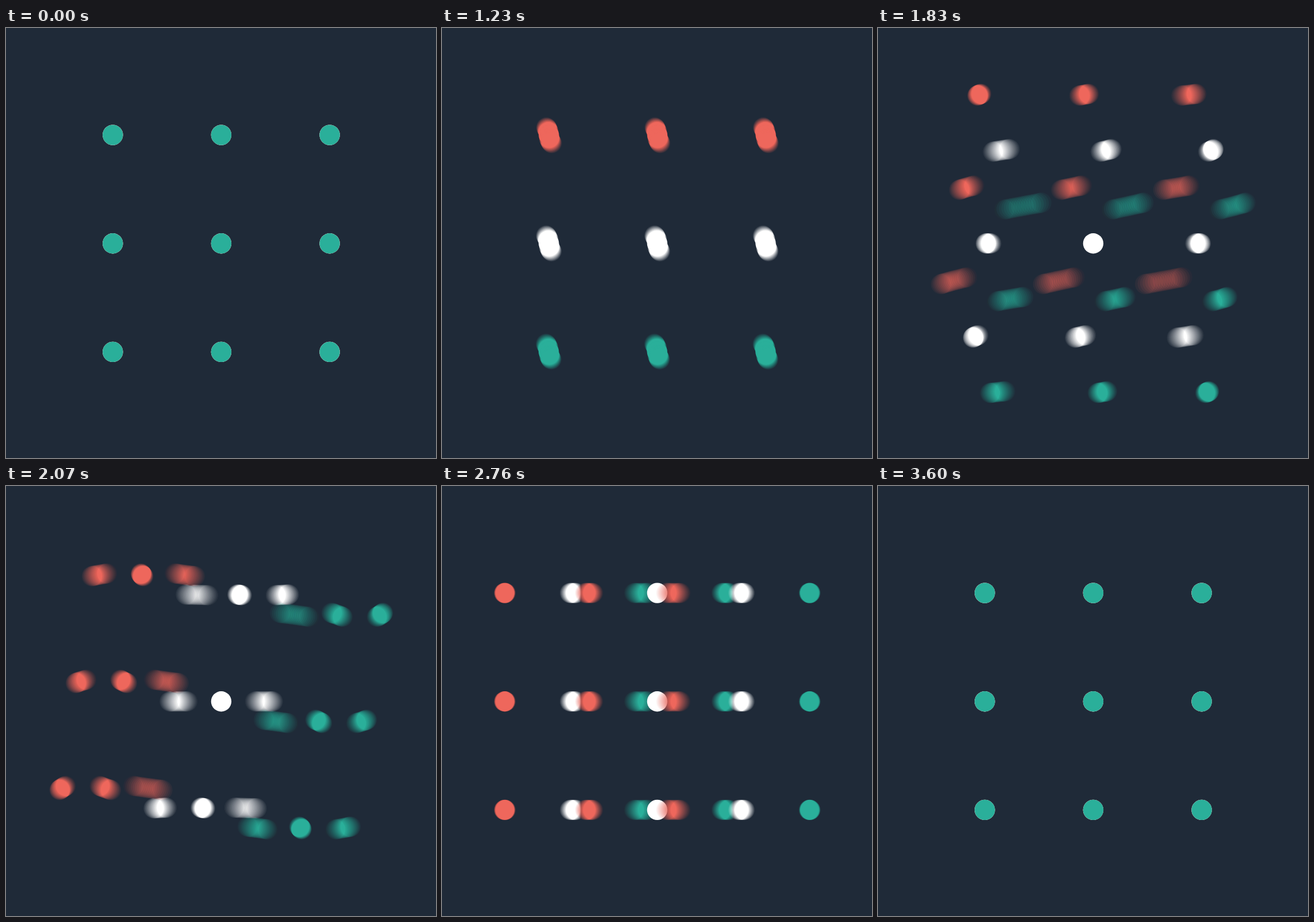
Animation of 748x748 px, one loop 3630 ms. Source, as an HTML page with a canvas:

```html
<!DOCTYPE html>
<html lang="en">
<head>
<meta charset="utf-8">
<title>Turning lattice</title>
<style>
  html, body { margin: 0; width: 100%; height: 100%; overflow: hidden; background: #1f2a38; }
  canvas { display: block; width: 748px; height: 748px; }
</style>
</head>
<body>
<canvas id="stage" width="748" height="748"></canvas>
<script>
const SIZE = 748, LOOP = 3630, STEP = 30;
const CX = 374.4, CY = 374.75, GAP = 188.65, RADIUS = 17.7;
const BG = '#1f2a38';
const COLORS = ['#ee675c', '#ffffff', '#2aaf9a']; // back to front
const SAMPLES = 16;

const view = document.getElementById('stage').getContext('2d');
const buffer = document.createElement('canvas');
buffer.width = buffer.height = SIZE;
const pen = buffer.getContext('2d');

const dots = [];
for (let z = -1; z <= 1; z++)
  for (let y = -1; y <= 1; y++)
    for (let x = -1; x <= 1; x++)
      dots.push({ x, y, z, color: COLORS[z + 1] });

const clamp = p => Math.min(1, Math.max(0, p));
const smooth = p => p * p * (3 - 2 * p);

// Constant speed with a short acceleration and braking
function glide(p) {
  const a = 0.2, v = 1 / (1 - a);
  if (p > 0.5) return 1 - glide(1 - p);
  return p < a ? v * p * p / (2 * a) : v * (p - a / 2);
}

// Tilt half a turn, spin once forward, then half a turn back
function angles(ms) {
  const tilt = Math.PI * glide(clamp(ms / 2400));
  const spin = 2 * Math.PI * smooth(clamp((ms - 1200) / 1200))
             - Math.PI * smooth(clamp((ms - 2400) / 1200));
  return [tilt, spin];
}

function project(dot, tilt, spin) {
  const y = dot.y * Math.cos(tilt) + dot.z * Math.sin(tilt);
  const z = dot.z * Math.cos(tilt) - dot.y * Math.sin(tilt);
  return {
    x: CX + GAP * (dot.x * Math.cos(spin) + z * Math.sin(spin)),
    y: CY + GAP * y,
    depth: z * Math.cos(spin) - dot.x * Math.sin(spin),
    color: dot.color
  };
}

function drawScene(ms) {
  const [tilt, spin] = angles(ms);
  pen.fillStyle = BG;
  pen.fillRect(0, 0, SIZE, SIZE);
  dots.map(d => project(d, tilt, spin))
    .sort((a, b) => a.depth - b.depth)
    .forEach(p => {
      pen.fillStyle = p.color;
      pen.beginPath();
      pen.arc(p.x, p.y, RADIUS, 0, 2 * Math.PI);
      pen.fill();
    });
}

// Motion blur: running average of scenes across the shutter time
function render(ms) {
  for (let i = 0; i < SAMPLES; i++) {
    drawScene(ms + STEP * ((i + 0.5) / SAMPLES - 0.5));
    view.globalAlpha = 1 / (i + 1);
    view.drawImage(buffer, 0, 0);
  }
}

const start = performance.now();
let shown = -1;
function tick(now) {
  const ms = Math.max(0, now - start) % LOOP;
  const frame = Math.floor((ms + 0.5) / STEP) % (LOOP / STEP);
  if (frame !== shown) {
    shown = frame;
    render(frame * STEP);
  }
  requestAnimationFrame(tick);
}
tick(start);
</script>
</body>
</html>
```
